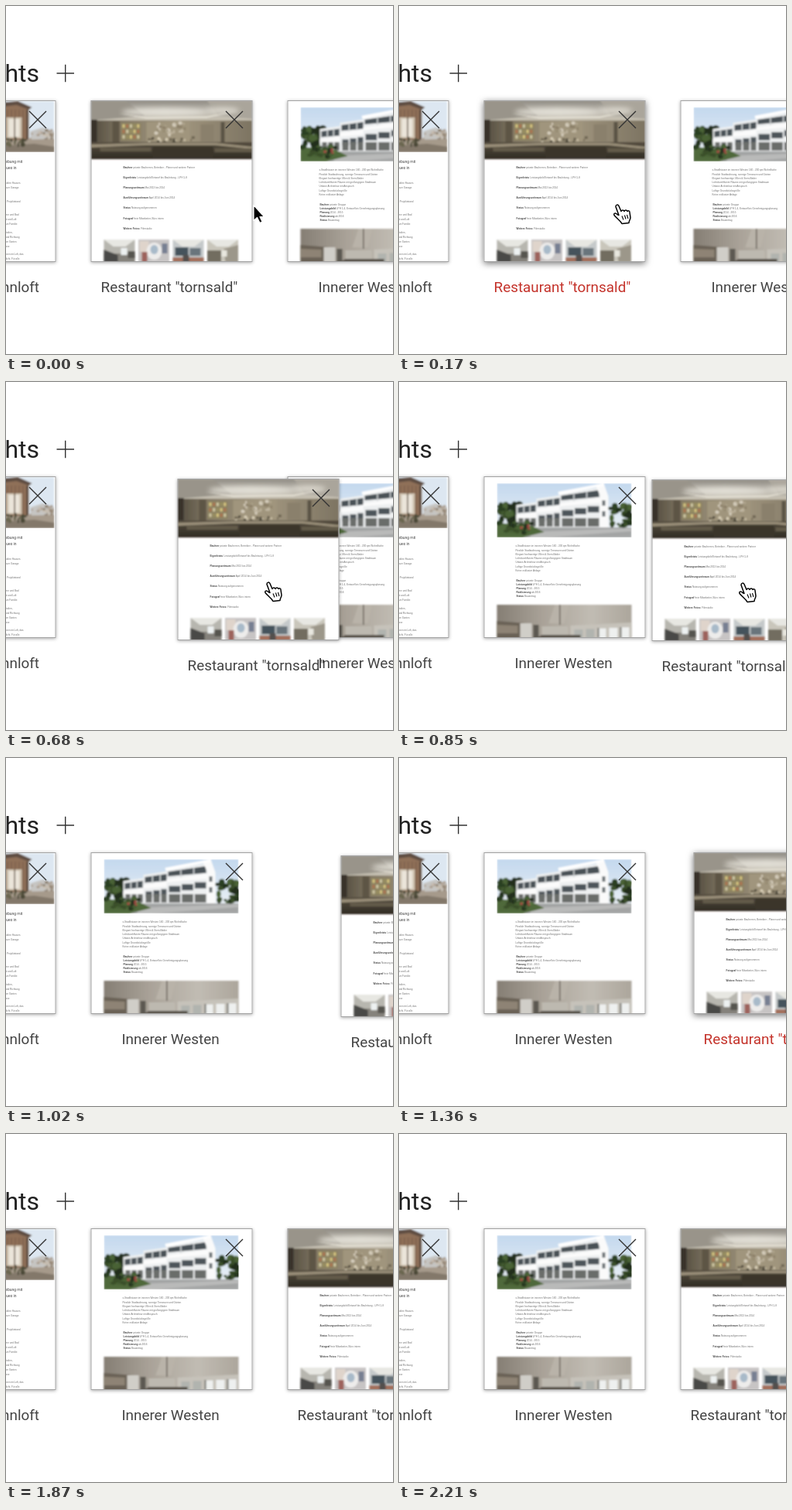
Recreate the animation shown at these times as an HTML page. Size 500 px wide and 450 px high, loop 2380 ms.

```html
<!DOCTYPE html>
<html lang="de">
<head>
<meta charset="utf-8">
<title>Highlights</title>
<style>
  html, body { margin: 0; width: 100%; height: 100%; overflow: hidden; background: #fff; }
  svg { display: block; width: 500px; height: 450px; font-family: Roboto, sans-serif; }
  .title { font-size: 32px; fill: #222; }
  .label { font-size: 18.9px; fill: #444; }
  .tiny { font: 3.15px "Liberation Sans", sans-serif; fill: #707070; }
  .bold { font-weight: bold; fill: #444; }
  .sheet { fill: #fff; filter: drop-shadow(0 1px 2px rgba(0, 0, 0, .35)); }
  .frame { fill: none; stroke: #a3a3a3; }
  .thin { fill: none; stroke: #333; stroke-width: 1.4; }
  .hover .label { fill: #c4332b; }
  .hover .sheet { filter: drop-shadow(0 2px 4px rgba(0, 0, 0, .55)); }
</style>
</head>
<body>
<svg viewBox="0 0 500 450">
  <defs>
    <clipPath id="page"><rect width="209" height="209"/></clipPath>
    <clipPath id="housePhoto"><rect x="17" y="9" width="174" height="70"/></clipPath>
    <clipPath id="loftPhoto"><rect x="1" y="1" width="206" height="66"/></clipPath>
    <filter id="soft"><feGaussianBlur stdDeviation=".8"/></filter>
    <filter id="glow" x="-50%" y="-100%" width="200%" height="300%"><feGaussianBlur stdDeviation="3"/></filter>
    <linearGradient id="sky" x2="0" y2="1"><stop stop-color="#c3d8ee"/><stop offset="1" stop-color="#f1f4f7"/></linearGradient>
    <linearGradient id="ceiling" x2="0" y2="1"><stop stop-color="#8f8b83"/><stop offset=".5" stop-color="#bab6ad"/><stop offset="1" stop-color="#c6c0b1"/></linearGradient>
    <linearGradient id="wall"><stop stop-color="#514a3d"/><stop offset=".2" stop-color="#857b67"/><stop offset=".55" stop-color="#a1967f"/><stop offset="1" stop-color="#7d7462"/></linearGradient>
    <linearGradient id="counter" x2="0" y2="1"><stop stop-color="#564e40"/><stop offset="1" stop-color="#302b23"/></linearGradient>
    <linearGradient id="room"><stop stop-color="#857e74"/><stop offset=".35" stop-color="#aaa399"/><stop offset=".7" stop-color="#c1bcb3"/><stop offset="1" stop-color="#aca69c"/></linearGradient>
  </defs>
  <text class="title" x="43" y="98" text-anchor="end">Highlights</text>
  <path class="thin" d="M65.500 87h22.500M76.700 75.700v22.500"/>
  <g id="cards"></g>
  <g id="cursor" stroke-linejoin="round">
    <path id="arrow" d="M0 0V20L4.500 16 8 23 11 21.500 8 15H13.500Z" fill="#000" stroke="#fff" stroke-width="1.200"/>
    <g id="hand" fill="#fff" stroke="#000" stroke-width="1.500">
      <path d="M-2 2C-2-1 1-1 2 1L5 8C6 6 8 6 9 8 10 6 12 6 13 8 14 7 16 7 16 9L17 16C17 19 15 20 15 23L6 24C4 20 0 18-4 13-5 10-2 10 0 12L2 13Z"/>
      <path d="M6 14l2 5M9.500 13l1.500 5M12.500 12.500l1.500 5" fill="none" stroke-width="1.100"/>
    </g>
  </g>
</svg>
<script>
const $ = id => document.getElementById(id);
const rect = (x, y, w, h, fill) => `<rect x="${x}" y="${y}" width="${w}" height="${h}" fill="${fill}"/>`;
const path = (d, fill) => `<path d="${d}" fill="${fill}"/>`;
const ellipse = (x, y, rx, ry, fill) => `<ellipse cx="${x}" cy="${y}" rx="${rx}" ry="${ry}" fill="${fill}"/>`;
const soft = body => `<g filter="url(#soft)">${body}</g>`;
const clip = (id, body) => `<g clip-path="url(#${id})">${body}</g>`;
const repeat = (n, draw) => Array.from({ length: n }, (_, i) => draw(i)).join('');
const tiny = (x, y, text, bold = '') =>
  `<text class="tiny" x="${x}" y="${y}"><tspan class="bold">${bold}</tspan> ${text}</text>`;
const endingAt = (x, y, text) => `<text class="tiny" x="${x}" y="${y}" text-anchor="end">${text}</text>`;

let seed = 7;
const random = () => (seed = seed * 16807 % 2147483647) / 2147483647;
const specks = (n, x, y, w, h, size, colors) => repeat(n, i =>
  ellipse(x + random() * w, y + random() * h, size * (.5 + random()), size * (.5 + random()), colors[i % colors.length]));
const greens = ['#2c3f24', '#3a5029', '#4a6236', '#222f1e'];

function restaurantPage() {
  const photo = rect(0, 0, 209, 27, 'url(#ceiling)') +
    path('M0 0H45L70 20 0 26Z', '#99948a') + path('M150 0H209V24L165 20Z', '#aaa59b') +
    `<g filter="url(#glow)">${ellipse(95, 15, 55, 5, '#e4e1d8')}${ellipse(170, 13, 22, 4, '#dedad0')}</g>` +
    path('M36 17L72 22 150 21 190 14 150 22.500 72 23.500Z', '#eeeade') +
    rect(0, 26, 209, 31, 'url(#wall)') +
    rect(0, 25, 8, 38, '#39332a') + rect(28, 27, 9, 28, '#5d5445') +
    rect(39, 29, 26, 23, '#8b8262') +
    repeat(15, i => rect(41 + i % 5 * 4.7, 31 + Math.floor(i / 5) * 7, 3, 4.5,
      ['#d6c47f', '#ad7350', '#cfc7a3', '#9a9060'][i % 4])) +
    rect(72, 28, 56, 25, '#a0957d') +
    specks(28, 84, 29, 38, 16, 1.8, ['#d6cebd', '#beb49e', '#8c8069']) +
    specks(22, 72, 48, 65, 6, 1.6, ['#4f493b', '#d9cfb7', '#6c6350']) +
    rect(142, 31, 17, 22, '#8a806c') + rect(168, 28, 5, 27, '#5a5244') +
    rect(0, 54, 209, 22, 'url(#counter)') +
    path('M0 57L72 55H162L209 60V63L160 58H72L0 61Z', '#9a8f79') +
    path('M12 61H78V66H12ZM160 62H209V67H160Z', '#625a4a') +
    rect(80, 60, 78, 14, '#3a342a');

  const lines = [
    ['Bauherr', 'private Bauherren, Betreiber - Planer und weitere Partner'],
    ['Eigenleistu', 'Leistungsbild Entwurf bis Bauleitung - LPH 1-8'],
    ['Planungszeitraum', 'Mai 2013 bis 2014'],
    ['Ausführungszeitraum', 'April 2014 bis Juni 2014'],
    ['Status', 'Nutzung aufgenommen'],
    ['Fotograf', 'freie Mitarbeiter, Büro intern'],
    ['Weitere Fotos:', 'Filmstudio']
  ].map(([bold, text], i) => tiny(42, 88 + i * 13.1, text, bold)).join('');

  const room = (x, tone) => rect(x, 180, 40, 30, tone) +
    path(`M${x} 180h40l-12 9h-16Z`, '#e7e7e2');
  const thumbs = room(17, '#b7b6af') + rect(17, 198, 40, 11, '#85827b') +
    path('M17 193L35 200V209H17Z', '#4a4946') + rect(39, 191, 8, 9, '#edf1f1') + rect(48, 195, 9, 9, '#565550') +
    rect(61.5, 180, 40, 29, '#c7c4c4') + rect(63, 182, 12, 14, '#dfd4cb') +
    ellipse(82, 195, 10, 11, '#edeceb') + ellipse(82, 193, 5, 6, '#a8bac9') +
    rect(66, 196, 7, 13, '#9d625b') + rect(92, 185, 7, 13, '#777f92') +
    room(106, '#c5c9ca') + rect(109, 190, 17, 11, '#44525c') + rect(128, 191, 14, 10, '#69747b') +
    rect(106, 203, 40, 6, '#a36f5c') + rect(119, 200, 8, 9, '#52504d') +
    room(150.5, '#c9c6bb') + rect(150.5, 194, 18, 15, '#726d60') +
    path('M172 192L190.500 187V209H174Z', '#9c978a') + rect(169, 194, 7, 8, '#e8e7df');
  return soft(photo) + lines + soft(thumbs);
}

function housesPage() {
  // A white terraced block: roof, glazed attic, parapet, windows and garages.
  const block = (x, w, top, rise) => {
    const band = (dx, y, width, h, fill) =>
      path(`M${x + dx} ${y}l${width} ${-rise * width / w}v${h}l${-width} ${rise * width / w * .6}Z`, fill);
    const bays = draw => repeat(3, i => draw(3 + i * (w - 4) / 3, (w - 4) / 3 - 2));
    return path(`M${x} ${top}l${w} ${-rise}V66H${x}Z`, '#eef0f1') +
      band(2, top + 3, w - 3, 9, '#4a5157') +
      bays((dx, width) => rect(x + dx + width, top + 1 - rise * dx / w, 1.5, 12, '#d5d9da')) +
      band(0, top + 13, w, 7, '#fbfbfb') +
      bays((dx, width) => rect(x + dx, top + 22 - rise * dx / w, width, 8, '#4d555a')) +
      bays((dx, width) => rect(x + dx, 54, width, 11, '#6b6d6b'));
  };
  const photo = rect(17, 9, 174, 70, 'url(#sky)') +
    specks(40, 17, 36, 30, 28, 4, greens) + specks(22, 164, 38, 27, 26, 4, greens) +
    block(42, 28, 37, 4) + block(68, 34, 29, 5) + block(98, 54, 22, 8) +
    path('M144 11L155 9 161 26V66H150V24Z', '#fafafa') + path('M96 20L154 9 156 12 97 24Z', '#fff') +
    rect(153, 31, 4, 7, '#697073') + rect(153, 45, 4, 7, '#697073') +
    path('M17 66H191V79H17Z', '#a3a4a4') + path('M60 72L191 67V71L80 79H60Z', '#b9bab9') +
    path('M17 60L62 64 78 72 50 79H17Z', '#50693a') +
    specks(30, 18, 58, 44, 15, 2.6, greens) + specks(14, 163, 60, 28, 5, 2.5, greens) +
    specks(7, 48, 64, 14, 4, 1.4, ['#a24b43', '#658348']);

  const intro = ['x-Stadthäuser im inneren Westen 160 - 200 qm Wohnfläche',
    'Flexible Stadtwohnung, sonnige Terrassen und Gärten',
    'Elegant hochwertige Villen &amp; Stein-Bäder',
    'Lichtdurchflutete Räume mit großzügigem Stadtraum',
    'Urbane Architektur mit Anspruch', 'Luftige Grundstücksgröße', 'Keine exklusive Anlage']
    .map((text, i) => tiny(41, 91.3 + i * 5.25, text)).join('');
  const facts = [['Bauherr', 'private Gruppe'],
    ['Leistungsbild', 'LPH 1-4, Entwurf bis Genehmigungsplanung'],
    ['Planung', '2014 - 2015'], ['Realisierung', 'ab 2016'], ['Status', 'Bauantrag']]
    .map(([bold, text], i) => tiny(42, 136 + i * 5, text, bold)).join('');

  const interior = rect(17, 166, 174, 44, 'url(#room)') +
    path('M92 166H110L104 190H84Z', '#b9b3a9') +
    path('M17 187L55 190V209H17Z', '#6a6256') + path('M17 192L44 193V203H17Z', '#8e8374') +
    rect(47, 190, 15, 19, '#d0cec8') + rect(64, 192, 7, 17, '#5b5851') +
    path('M97.500 166H99V192H97.500Z', '#645e57') + rect(75, 194, 34, 12, '#bdb9b0') +
    path('M112 193L191 189V209H112Z', '#c6c2ba') +
    repeat(5, i => rect(117 + i * 15, 198 - i * .7, 11, 14, i > 1 ? '#eef0ef' : '#b1b4af')) +
    rect(147, 196, 2, 13, '#6e6c66') + rect(176, 195, 2, 14, '#777872') +
    path('M75 205H125V209H68Z', '#565149');
  return clip('housePhoto', soft(photo)) + intro + facts + soft(interior);
}

function loftPage() {
  const photo = rect(1, 1, 206, 66, '#dde7f1') +
    path('M125 8L158 4 174 9V54H125Z', '#8f7058') +
    path('M125 4L160 1 178 9 174 12 158 6 125 10Z', '#5e4d42') +
    repeat(6, i => rect(146 + i * 5, 12, 1, 40, '#765a46')) +
    rect(145, 22, 20, 27, '#cfc3b1') + rect(148, 24, 14, 23, '#ebe5da') + rect(155, 22, 1.5, 27, '#655244') +
    rect(171, 12, 2, 46, '#4c4037') +
    path('M176 40L192 35 207 40V54H176Z', '#c6c5c2') +
    specks(22, 176, 38, 30, 13, 2, ['#a89a8b', '#8a7d6c', '#c9bfb2']) +
    path('M125 52L207 50V67H125Z', '#a69a8b') + path('M125 60L181 56 207 60V67H125Z', '#83786b') +
    specks(14, 145, 50, 24, 8, 2.2, ['#4b4a38', '#6b6650']);
  const copy = [[108, 163, 'Umbau eines alten Hauses'], [114, 161, 'mit neuer Garage'], [132, 163, 'Büro für Projektstand'],
    [149, 161, 'offene Räume und Bad'], [155, 158, 'mit viel Licht und Luft'], [161, 159, 'für die ganze Familie'],
    [172, 153, 'neue Materialien,'], [178, 162, 'klare Form und Richtung'], [184, 158, 'mit eigenem Garten'],
    [190, 149, 'und Terrasse'], [200, 167, 'Wohnen im Loft, das'], [206, 162, 'Tageslicht. Für alle']]
    .map(([y, x, text]) => endingAt(x, y, text)).join('');
  const heading = [[81, 166, 'Umgebung mit'], [88.5, 158, 'Neues in']]
    .map(([y, x, text]) => `<text x="${x}" y="${y}" text-anchor="end" font-size="5" fill="#444">${text}</text>`).join('');
  return clip('loftPhoto', soft(photo)) + heading + copy;
}

const card = (id, page, label, x, anchor) => `<g id="${id}">
  <rect class="sheet" width="209" height="209"/>
  ${clip('page', page)}
  <rect class="frame" x=".5" y=".5" width="208" height="208"/>
  <path class="thin" d="M174.500 14l22 22m0-22l-22 22"/>
  <text class="label" x="${x}" y="248" text-anchor="${anchor}">${label}</text></g>`;

$('cards').innerHTML = card('loft', loftPage(), 'Wohnloft', 187.5, 'end') +
  card('houses', housesPage(), 'Innerer Westen', 103, 'middle') +
  card('restaurant', restaurantPage(), 'Restaurant "tornsald"', 13, 'start');

const STEP = 170, STEPS = 14, LEFT = 109.5, PITCH = 254, TOP = 122;
const dragX = [0, 0, 0, 0, 112, 217, 323, 312, 271];
const dragY = [0, 0, 0, 0, 3, 4, 4, 3.5, 0];
const approach = [320, 282, 242, 222];
const place = (id, x, y) => $(id).setAttribute('transform', `translate(${x} ${y})`);
const show = (id, visible) => $(id).style.display = visible ? '' : 'none';

function draw(now) {
  const step = Math.floor(now / STEP) % STEPS;
  const dx = dragX[step] ?? PITCH, dy = dragY[step] ?? 0;
  const swapped = dx > PITCH / 2;
  place('loft', LEFT - PITCH, TOP);
  place('houses', LEFT + (swapped ? 0 : PITCH), TOP);
  place('restaurant', LEFT + dx, TOP + dy);
  const hovered = step >= 1 && step <= 3 || step >= 8 && step <= 10;
  $('restaurant').classList.toggle('hover', hovered);

  // The pointer leaves the stage with the dragged card and stays outside.
  place('cursor', approach[step] ?? 227 + dx, step < 4 ? 257.5 : 256.5 + dy);
  show('arrow', step === 0);
  show('hand', step > 0 && step < 6);
  requestAnimationFrame(draw);
}
draw(0);
</script>
</body>
</html>
```
